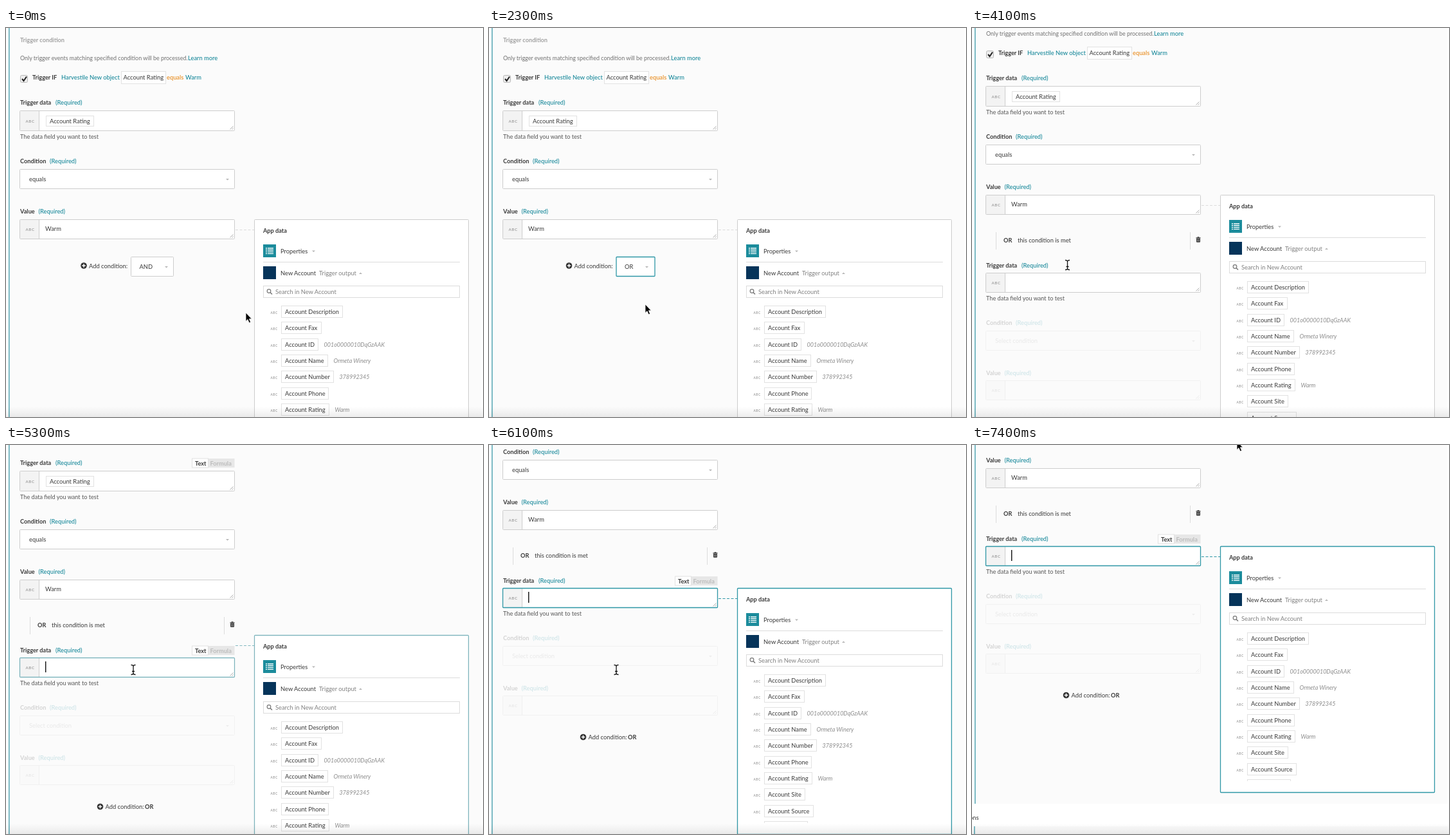
An HTML page that plays this animation: 742 px wide and 604 px high, repeating every 7500 ms.

```html
<!DOCTYPE html>
<html lang="en">
<head>
<meta charset="utf-8">
<title>Trigger condition</title>
<style>
html, body { margin: 0; width: 100%; height: 100%; overflow: hidden; background: #fff; }
svg { display: block; }
text { font: 9.35px Lato, "Open Sans", sans-serif; fill: #3a3a3a; white-space: pre; }
.b { font-weight: 700; font-size: 9.2px; }
.m { font-weight: 500; font-size: 9.3px; }
.s { font-size: 9.15px; fill: #555; }
.n { font-size: 8.95px; fill: #707070; }
.t { fill: #17889a; }
.o { fill: #e88a1a; }
.g { fill: #808080; }
.l { fill: #a2a2a2; }
.f { fill: #bcbcbc; }
.i { font-style: italic; font-size: 9px; fill: #8c8c8c; }
.abc { font-size: 6px; font-weight: 700; letter-spacing: .7px; fill: #a0a0a0; }
.row { font-size: 4.6px; letter-spacing: .6px; }
.box { fill: #fff; stroke: #cdcdcd; }
.chip { fill: #fff; stroke: #e2e2e2; }
.thin { fill: none; stroke: #dcdcdc; }
.focus { fill: none; stroke: #2f97a6; stroke-width: 1.3; }
.dash { stroke-width: 1; stroke-dasharray: 4 2.5; }
</style>
</head>
<body>
<svg id="stage" width="742" height="604" viewBox="0 0 742 604"></svg>
<script>
const stage = document.getElementById('stage');

// y is the middle of the line of text
const text = (x, y, s, cls = '') => `<text x="${x}" y="${y + 3.2}" class="${cls}">${s}</text>`;
const rect = (x, y, w, h, cls, more = '') =>
  `<rect x="${x}" y="${y}" width="${w}" height="${h}" class="${cls}" ${more}/>`;
const path = (d, more) => `<path d="${d}" ${more}/>`;
const group = (id, body) => `<g id="${id}">${body}</g>`;
const arrow = (x, y, up = 1) => path(`M${x - 2.5} ${y - up}h5l-2.5 ${2.6 * up}z`, 'fill="#b5b5b5"');
const label = (y, s, x) => text(22, y, s, 'b') + text(x, y, '(Required)', 'm t');

const field = (y, h = 30) =>
  rect(21.5, y + .5, 334, h, 'box', 'rx="1"') +
  rect(22, y + 1, 29.5, h - 1, '', 'fill="#f3f3f3"') +
  path(`M51.5 ${y + 1}v${h - 1}`, 'stroke="#cdcdcd"') +
  text(30.5, y + h / 2 - .2, 'ABC', 'abc') +
  path(`M348.5 ${y + h - 1.5}l5-5m-2 5l2-2`, 'stroke="#999" stroke-width=".8"');

const select = (y, s, cls) =>
  rect(21.5, y + .5, 334, 30, 'box', 'rx="1"') + text(36, y + 15.5, s, cls) + arrow(344.5, y + 16);

const chip = (x, y, w, s, h = 18) => rect(x + .5, y - h / 2, w, h, 'chip') + text(x + 6, y, s);

const plus = (x, y) =>
  `<circle cx="${x}" cy="${y}" r="4.8" fill="#333"/>` +
  path(`M${x - 2.8} ${y}h5.6M${x} ${y - 2.8}v5.6`, 'stroke="#fff" stroke-width="1.5"');

const adder = (id, x, word, left, width, tip, cls) => group(id,
  plus(x, 369) + text(x + 8, 369.5, 'Add condition:') +
  rect(left + .5, 355.5, width, 30, cls, 'rx="1" style="fill:#fff"') +
  text(left + 13.5, 370.5, word) + arrow(tip, 371));

const toggle = y =>
  rect(289.5, y - 6.5, 66, 14, '', 'fill="#e7e7e7"') +
  rect(289.5, y - 6.5, 25, 14, 'chip') +
  text(294, y + 1, 'Text', 'b') + text(317.5, y + 1, 'Formula', 'b f');

const header =
  text(22, 19, 'Trigger condition', 'b l') +
  text(22, 47, 'Only trigger events matching specified condition will be processed.', 'n') +
  text(283, 47, 'Learn more', 'm t') +
  rect(22.5, 73.5, 11, 11, '', 'rx="2" fill="#eee" stroke="#b8b8b8"') +
  path('M25 79l2.5 3l4.5-6.5', 'fill="none" stroke="#222" stroke-width="2"') +
  text(41, 77, 'Trigger IF', 'b') + text(86, 77, 'Harvestile New object', 'm t') +
  chip(179, 77, 69, '', 19) + text(182.5, 77, 'Account Rating') +
  text(250, 77, 'equals', 'm o') + text(279, 77, 'Warm', 'm t');

const first =
  label(115.5, 'Trigger data', 77) + field(128, 31) + chip(62, 144.5, 74, 'Account Rating', 16) +
  text(22, 168.5, 'The data field you want to test', 's') +
  label(206.5, 'Condition', 68) + select(219, 'equals') +
  label(284.5, 'Value', 50.5) + field(297) + text(61, 312, 'Warm');

const second =
  path('M37.5 355v27M339.5 355v27', 'class="thin"') +
  text(49, 368, 'OR', 'b') + text(71, 368, 'this condition is met') +
  path('M348.5 363.3h7v1.2h-7zM350.6 362.3h2.8v1h-2.8zM349 365h6v4.8q0 1-1 1h-4q-1 0-1-1z', 'fill="#333"') +
  path('M350.5 366v3.6m1.5-3.6v3.6m1.5-3.6v3.6', 'stroke="#ccc" stroke-width=".6"') +
  label(406.5, 'Trigger data', 77) + field(418) +
  text(22, 458, 'The data field you want to test', 's') +
  `<g opacity=".2">${label(496, 'Condition', 68) + select(508, 'Select condition', 'l') +
    label(574, 'Value', 50.5) + field(585)}</g>` +
  plus(146.5, 649.5) + text(154.5, 650, 'Add condition:') + text(216, 650, 'OR', 'b');

const accounts = [
  ['Description', 95], ['Fax', 62], ['ID', 57, '001o0000010DqGzAAK'], ['Name', 72, 'Ormeta Winery'],
  ['Number', 81, '378992345'], ['Phone', 73], ['Rating', 74, 'Warm'], ['Site', 63], ['Source', 76], ['Type', 67]
];
const rows = accounts.map(([name, w, value = ''], n) => {
  const y = Math.round(143 + n * 25.35);
  return text(411.5, y + 1, 'ABC', 'abc row') + chip(428, y + .5, w, 'Account ' + name) +
    text(437.5 + w, y + .5, value, 'i');
}).join('');

const link = 'M357 16.5H386';
const panel =
  path(link, 'class="thin dash"') +
  rect(386.5, .5, 333, 382, 'box', 'rx="1"') +
  text(400, 17.5, 'App data', 'b') +
  rect(400, 39, 20, 20, '', 'fill="#1c8c9c"') +
  path('M404 45h2m1 0h9m-12 2.8h2m1 0h9m-12 2.8h2m1 0h9m-12 2.8h2m1 0h9', 'stroke="#fff" stroke-width="1.4"') +
  text(427, 49.5, 'Properties') + arrow(478.5, 49.5) +
  path('M400 66.5H706', 'class="thin"') +
  rect(400, 73, 20, 20, '', 'fill="#06345a"') +
  text(427, 83.5, 'New Account') + text(487, 83.5, 'Trigger output', 'g') + arrow(551.5, 84, -1) +
  rect(400.5, 103.5, 305, 18, 'chip', 'style="stroke:#dcdcdc"') +
  '<circle cx="409" cy="111.5" r="2.8" fill="none" stroke="#777" stroke-width="1.2"/>' +
  path('M411 113.5l3 3', 'stroke="#777" stroke-width="1.5"') +
  text(419, 113, 'Search in New Account', 'g') +
  `<g clip-path="url(#list)">${rows}</g>` +
  group('panelFocus', rect(386.5, .5, 333, 382, 'focus', 'rx="1"') + path(link, 'class="focus dash"'));

const page = [[4.2, 0, 818], [3.2, 853, 300]].map(([x, y, h]) =>
  rect(x, y, 739.5 - x, h, '', 'fill="#fbfbfb"') + rect(x, y, 1.3, h, '', 'fill="#3a98a7"')).join('') +
  `<text x="10.5" y="842.7" text-anchor="end">Actions</text>`;

stage.innerHTML =
  `<defs><clipPath id="list"><rect x="400" y="124" width="310" height="241"/></clipPath>
   <linearGradient id="shade" x2="0" y2="1"><stop stop-opacity="0"/><stop offset="1" stop-opacity=".07"/></linearGradient></defs>` +
  group('scroll', page + header + first +
    adder('and', 121, 'AND', 194, 66, 249.5, 'box') + adder('or', 124.5, 'OR', 197.5, 60, 245.5, 'focus') +
    group('second', second) + group('toggles', toggle(115.5) + toggle(406.5)) +
    group('fieldFocus', rect(21.5, 418.5, 334, 30, 'focus', 'rx="1"')) +
    path('M61.7 424v17', 'id="caret" stroke="#111" stroke-width="1.4"') +
    group('panel', panel)) +
  rect(0, 588, 742, 16, '', 'fill="url(#shade)"') +
  path('M0 0V13.4L3 10.6L5.2 15.8L7.6 14.8L5.4 9.8H9.3Z', 'id="pointer" stroke="#fff" stroke-width=".8"') +
  group('beam', ['stroke="#fff" stroke-width="2.8"', 'stroke="#111" stroke-width="1.3"'].map(s =>
    path('M-3.5-7.5Q0-7.5 0-5.5V5.5Q0 7.5-3.5 7.5M3.5-7.5Q0-7.5 0-5.5M0 5.5Q0 7.5 3.5 7.5M-2 2.5H2', 'fill="none" ' + s)).join(''));

const LOOP = 7500, STEP = 100, PICK = 1700, ADD = 3700, CLICK = 5050;
const scrollKeys = [[4000, 0], [4100, 38], [4350, 88], [5550, 88], [6100, 196], [6400, 225], [6600, 251], [6900, 261]];
const mouseKeys = [
  [0, 373, 442], [800, 232, 374], [1300, 232, 374], [2000, 245, 440], [2300, 243, 429], [3200, 122, 369],
  [3800, 122, 369], [4100, 148.5, 368], [4300, 148.5, 368], [4900, 198, 349], [6700, 198, 349], [7400, 412, -6]
];
const smooth = u => u * u * (3 - 2 * u);
const clamp = u => Math.min(1, Math.max(0, u));

function at(keys, t, ease = u => u) {
  const n = keys.findIndex(k => k[0] > t);
  if (n < 0) return keys.at(-1).slice(1);
  if (n === 0) return keys[0].slice(1);
  const a = keys[n - 1], b = keys[n], u = ease((t - a[0]) / (b[0] - a[0]));
  return a.slice(1).map((v, i) => v + (b[i + 1] - v) * u);
}

const $ = id => document.getElementById(id);
const move = (id, x, y) => $(id).setAttribute('transform', `translate(${x} ${y})`);
const fade = (id, v) => $(id).setAttribute('opacity', +v);

function draw() {
  const t = Math.floor(performance.now() % LOOP / STEP) * STEP;
  const [x, y] = at(mouseKeys, t, smooth);
  const moved = 1 - (1 - clamp((t - CLICK) / 540)) ** 2;
  const inField = t >= 4000 && t < 6800;

  move('scroll', 0, -Math.round(at(scrollKeys, t)[0]));
  move('panel', 0, Math.round(297 + 121 * moved));
  fade('panelFocus', moved ** 2);
  fade('fieldFocus', moved ** 2);
  fade('and', t < PICK);
  fade('or', t >= PICK && t < ADD);
  fade('second', clamp((t - ADD + STEP) / 400));
  fade('toggles', t >= CLICK);
  fade('caret', t >= CLICK && (t - CLICK) % 1000 < 500);
  move('pointer', x, y);
  move('beam', x, y);
  fade('pointer', !inField);
  fade('beam', inField);
  requestAnimationFrame(draw);
}
draw();
</script>
</body>
</html>
```
